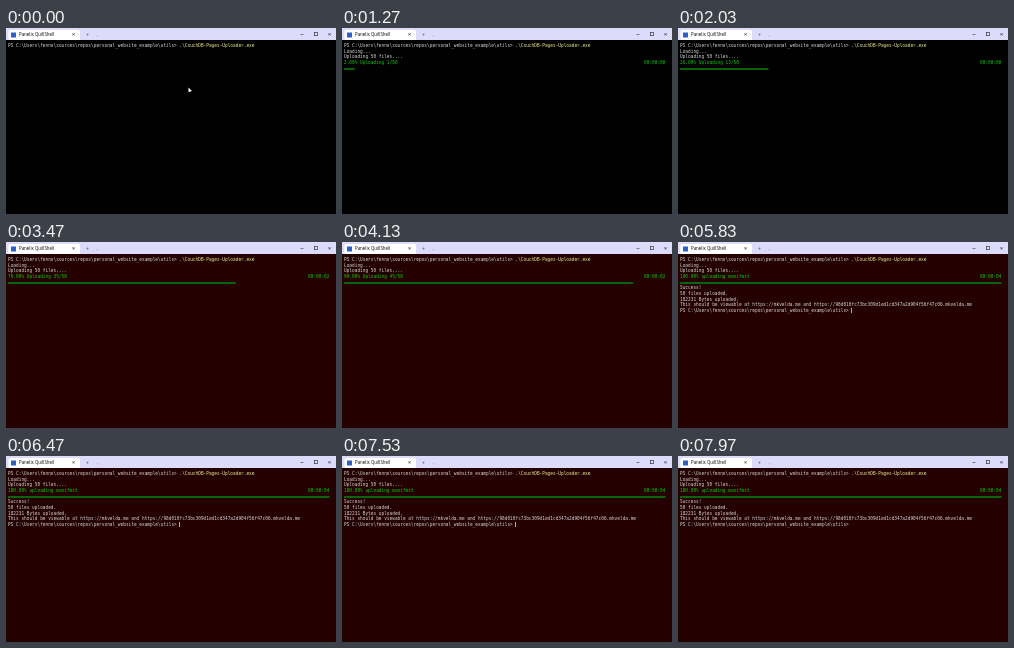
An HTML page with a canvas for the animation above (8.13 s loop, 330 by 186 pixels).

```html
<!DOCTYPE html>
<html lang="en">
<head>
<meta charset="utf-8">
<style>
html, body { margin: 0; width: 330px; height: 186px; overflow: hidden; background: #000; }
canvas { display: block; }
</style>
</head>
<body>
<canvas id="stage" width="330" height="186"></canvas>
<script>
const ctx = document.getElementById('stage').getContext('2d');
const LOOP = 8130, TOTAL = 50, STEP = 64.7, COLS = 120;
const FONT = 4.45, CELL = FONT * 0.602, LEFT = 2, TOP = 17.8, LINE = 5.67;
const MONO = '"DejaVu Sans Mono", monospace', SANS = '"Open Sans", sans-serif';
const GREY = '#d8d8d8', YELLOW = '#ecf090', GREEN = '#10cc10', INK = '#222222';
const PROMPT = 'PS C:\\Users\\fenno\\sources\\repos\\personal_website_example\\utils>';
const COMMAND = '.\\CouchDB-Pages-Uploader.exe';
const HOST = 'mkvelda.me';
const HASH = '98d010fc73bc309d1ed1cd347a2d904f56f47c06';

function rect(x, y, w, h, color) {
  ctx.fillStyle = color;
  ctx.fillRect(x, y, w, h);
}

// Large font drawn small keeps glyph advances fractional.
function text(str, x, y, color, size, family, align = 'left') {
  ctx.save();
  ctx.translate(x, y);
  ctx.scale(0.1, 0.1);
  ctx.font = `${size * 10}px ${family}`;
  ctx.textAlign = align;
  ctx.textBaseline = 'middle';
  ctx.fillStyle = color;
  ctx.fillText(str, 0, 0);
  ctx.restore();
}

function print(row, col, str, color = GREY) {
  text(str, LEFT + col * CELL, TOP + row * LINE, color, FONT, MONO);
}

function titleBar() {
  const icon = (glyph, x, color = INK, size = 6) => text(glyph, x, 6.5, color, size, MONO, 'center');
  rect(0, 0, 330, 12, '#dcdcfa');
  ctx.fillStyle = '#ffffff';
  ctx.beginPath();
  ctx.roundRect(2.5, 2, 71.5, 10, [2, 2, 0, 0]);
  ctx.fill();
  rect(5, 4.5, 5, 5, '#2c62c8');
  text('Panelix QuillShell', 13, 7.2, '#000000', 4.4, SANS);
  icon('×', 67.5);
  icon('+', 81.5, '#555555', 5);
  icon('⌄', 91.5, '#8888a0', 4);
  icon('−', 296);
  icon('×', 323.5);
  ctx.strokeStyle = INK;
  ctx.lineWidth = 0.6;
  ctx.strokeRect(308.3, 4.3, 3.4, 3.4);
}

function pointer(x, y) {
  ctx.fillStyle = '#ffffff';
  ctx.beginPath();
  ctx.moveTo(x, y);
  ctx.lineTo(x, y + 4.8);
  ctx.lineTo(x + 3.4, y + 3.4);
  ctx.fill();
}

// Uploads run at a steady rate with a short stall before the last files.
function filesDone(t) {
  const active = Math.min(t, 4140) - 1230 + Math.max(0, t - 4430);
  return Math.min(TOTAL, 1 + Math.floor(active / STEP));
}

function progress(t) {
  const ratio = filesDone(t) / TOTAL;
  const label = t < 5400 ? `Uploading ${filesDone(t)}/${TOTAL}` : 'uploading manifest';
  const seconds = Math.min(4, Math.floor((t - 1200) / 1000));
  print(3, 0, `${(ratio * 100).toFixed(2)}% ${label}`, GREEN);
  print(3, COLS - 8, `00:00:0${seconds}`, GREEN);
  rect(LEFT, 40, Math.round(2 + ratio * (COLS - 2)) * CELL, 2, '#086408');
}

function summary(t) {
  const lines = [
    'Success!',
    `${TOTAL} files uploaded.`,
    '182231 Bytes uploaded.',
    `This should be viewable at https://${HOST} and https://${HASH}.${HOST}`,
    PROMPT
  ];
  lines.forEach((line, i) => print(5 + i, 0, line));
  // The caret turns on every 1100 ms and stays lit for about half of that.
  const phase = (t - 5330) % 1100;
  if (phase < 570 && t < 7930) rect(173, 66, 1, 5, '#b0b0b0');
}

function draw(t) {
  rect(0, 0, 330, 186, t < 3400 ? '#000000' : '#240000');
  titleBar();
  print(0, 0, PROMPT);
  print(0, PROMPT.length + 1, COMMAND, YELLOW);
  if (t < 600) pointer(182.5, 59.5);
  if (t >= 900) print(1, 0, 'Loading...');
  if (t >= 1130) print(2, 0, `Uploading ${TOTAL} files....`);
  if (t >= 1230) progress(t);
  if (t >= 5700) summary(t);
}

const start = performance.now();
function tick() {
  draw((performance.now() - start) % LOOP);
  requestAnimationFrame(tick);
}
tick();
</script>
</body>
</html>
```
